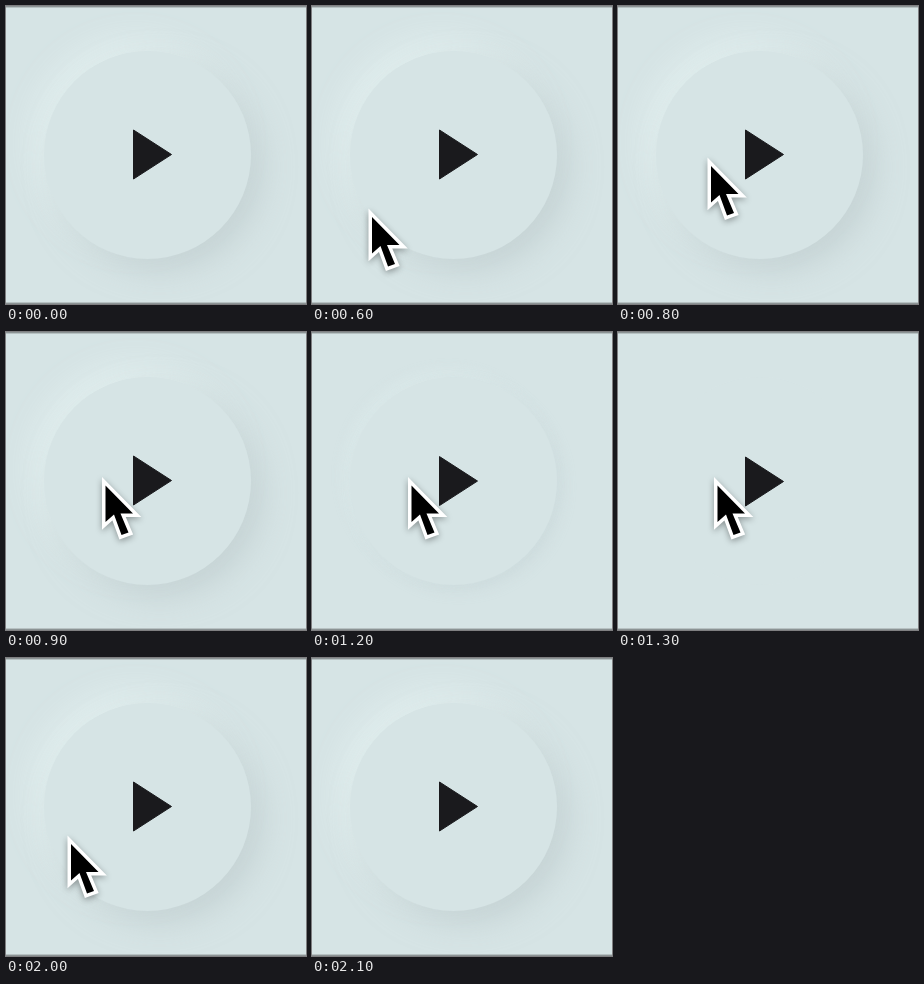
Write an HTML page that moves like this. It is 300 by 298 pixels and loops after 3 s.

```html
<!DOCTYPE html>
<html lang="en">
<head>
<meta charset="utf-8">
<title>Soft play button</title>
<style>
  html, body { margin: 0; width: 100%; height: 100%; overflow: hidden; background: #d6e4e5; }
  #stage { position: relative; width: 300px; height: 298px; overflow: hidden; }
  #stage::before, #stage::after {
    content: ""; position: absolute; left: 0; width: 100%; height: 2px;
    background: linear-gradient(#8b9394 50%, #b7c1c2 50%);
  }
  #stage::before { top: 0; }
  #stage::after { bottom: 0; transform: scaleY(-1); }
  #button {
    position: absolute; left: 38px; top: 45px; width: 207px; height: 208px;
    border-radius: 50%; background: #d6e4e5;
  }
  svg { position: absolute; inset: 0; }
  #play { filter: blur(.5px); }
  #cursor { filter: blur(.4px) drop-shadow(0 2px 3px rgba(0, 0, 0, .35)); }
</style>
</head>
<body>
<div id="stage">
  <div id="button"></div>
  <svg width="300" height="298">
    <path id="play" d="M127.5 124 L165.5 148.5 L127.5 173 Z" fill="#1a1a1d" stroke="#1a1a1d" stroke-linejoin="round"/>
    <g id="cursor">
      <path d="M0 0 V36.5 L8.5 29 L16 49.5 L23 47 L15 28 H27.5 Z"
            fill="#000" stroke="#fff" stroke-width="7" stroke-miterlimit="6" paint-order="stroke"/>
    </g>
  </svg>
</div>
<script>
const LOOP = 3000;
const button = document.getElementById('button');
const play = document.getElementById('play');
const cursor = document.getElementById('cursor');

// Stepped tracks: [start in ms, ...values], each held until the next.
const pointer = [
  [0], [600, 60, 211], [700, 80, 176.5], [800, 93, 160],
  [900, 99.5, 153.5], [2000, 65, 186], [2100]
];
const raised = [[0, 1], [1200, .45], [1300, 0], [1700, .75], [2000, 1]];

const at = (track, t) => track.findLast(([start]) => start <= t).slice(1);

function draw(now) {
  const t = now % LOOP;
  const [x, y] = at(pointer, t);
  const [height] = at(raised, t);
  const offset = 12 * height, blur = 30 * height;

  cursor.style.display = x === undefined ? 'none' : '';
  if (x !== undefined) cursor.setAttribute('transform', `translate(${x} ${y})`);

  button.style.boxShadow =
    `${offset}px ${offset}px ${blur}px rgba(186, 200, 202, ${.6 * height}),` +
    `${-offset}px ${-offset}px ${blur}px rgba(226, 239, 239, ${.9 * height})`;
  play.setAttribute('transform', `translate(0 ${1 - height})`);
  requestAnimationFrame(draw);
}
requestAnimationFrame(draw);
</script>
</body>
</html>
```
